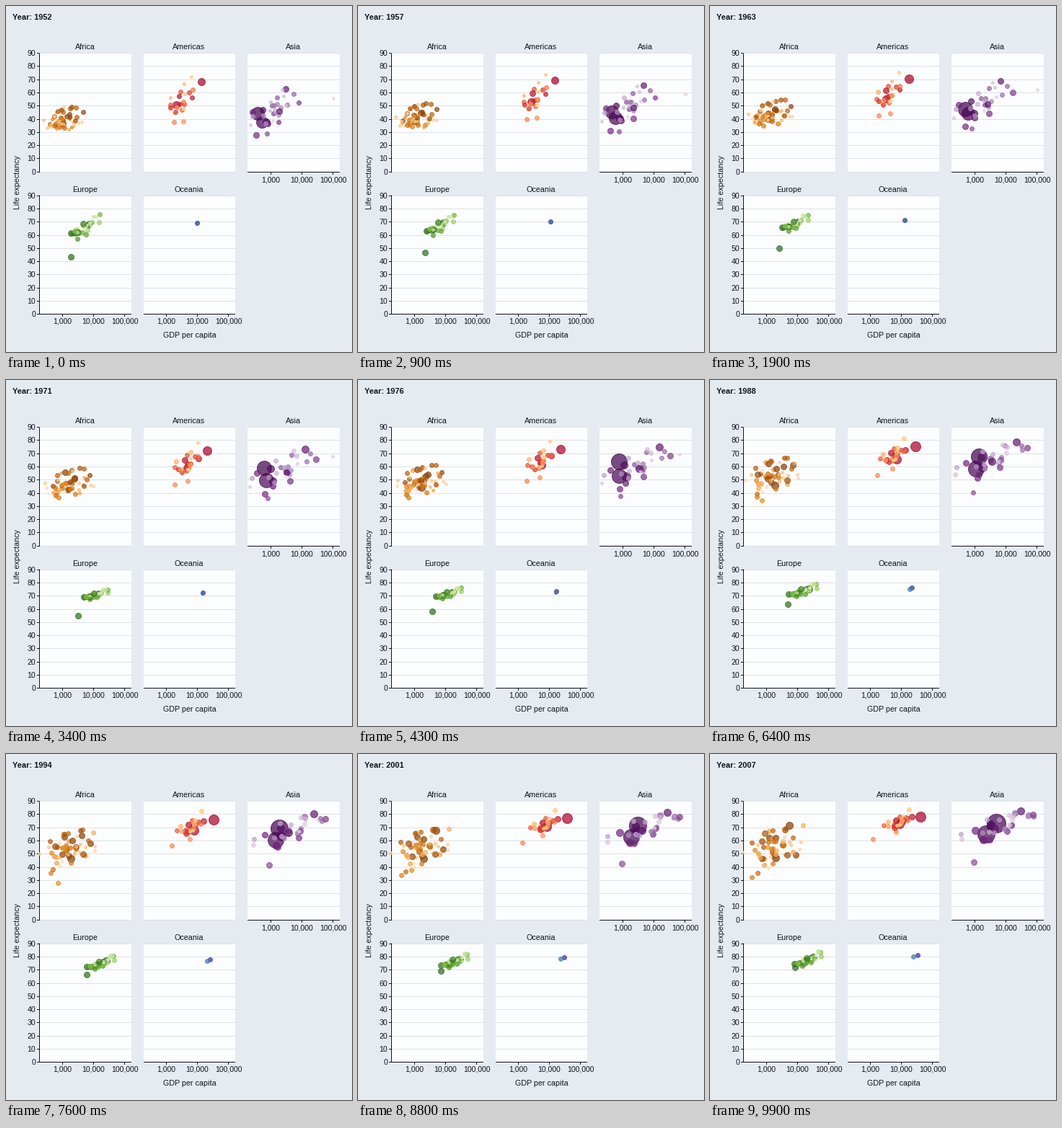
Write a matplotlib script that moves like this. It is 480x480 px and loops after 10 s.

```python
import matplotlib.pyplot as plt
import numpy as np
from matplotlib.animation import FuncAnimation
from matplotlib.colors import LinearSegmentedColormap
from matplotlib.patches import Rectangle

SIZE, DPI = 480, 100
PX = 72 / DPI                      # one pixel in points
FRAMES, FIRST, LAST = 100, 1952, 2007
U = np.linspace(0, 1, FRAMES)      # progress through the years
COLS, ROWS = (46.2, 190.6, 335.1), (230.2, 427.7)
PANEL_W, PANEL_H, UNIT, DECADE = 127.6, 165, 164.5 / 90, 43
INK = "#10141c"

plt.rcParams["font.family"] = "Liberation Sans"

# trend: (log income, life, spread of each) of the crowd, evenly spaced in time
# key: rank -> (population in millions, evenly spaced (income, life) points)
# crowd: largest population and its decay with rank
PANELS = [
    dict(title="Africa", col=0, row=0, n=52, crowd=(70, 0.08), growth=0.27,
         colors=["#7F3B08", "#B35806", "#E08214", "#FDB863", "#FEE0B6"],
         tie=0.4, turn=0.8,
         trend=[(3.02, 39, 0.28, 5), (3.19, 46.5, 0.36, 6),
                (3.18, 53.4, 0.39, 7.5), (3.24, 54.8, 0.42, 9)],
         key={0: (135, [(1077, 36.3), (1900, 45.5), (2014, 46.9)]),
              1: (80, [(1419, 42), (3200, 55.5), (5581, 71.3)]),
              4: (44, [(4725, 45), (7600, 53), (7500, 61.5), (9270, 49.3)]),
              28: (9, [(493, 40), (520, 43.5), (780, 45.5), (735, 26.5),
                       (863, 46.2)])}),
    dict(title="Americas", col=1, row=0, n=25, crowd=(75, 0.14), growth=0.42,
         colors=["#A50026", "#D73027", "#F46D43", "#FDAE61", "#FEE090"],
         tie=0.6, turn=0.5,
         trend=[(3.5, 53.5, 0.21, 8.5), (3.68, 62, 0.21, 6.5),
                (3.76, 69, 0.21, 4.8), (3.92, 74, 0.22, 3.5)],
         key={0: (301, [(13990, 68.4), (25000, 73.8), (42952, 78.2)]),
              1: (190, [(2109, 50.9), (6800, 62.5), (9066, 72.4)]),
              14: (8, [(1840, 37.6), (1950, 50.7), (1202, 60.9)])}),
    dict(title="Asia", col=2, row=0, n=33, crowd=(200, 0.13), growth=0.39,
         colors=["#40004B", "#762A83", "#9970AB", "#C2A5CF", "#E7D4E8"],
         tie=0.7, turn=0.6,
         trend=[(3.1, 46.5, 0.38, 8.5), (3.4, 57, 0.48, 8.5),
                (3.6, 66, 0.5, 7), (3.82, 71, 0.5, 6)],
         key={0: (1318, [(400, 44), (513, 47.3), (700, 63.5), (1210, 66.6),
                         (2160, 70.1), (4959, 73)]),
              1: (1110, [(547, 37.4), (840, 55.5), (2452, 64.7)]),
              2: (224, [(750, 37.5), (1450, 54.5), (3541, 70.7)]),
              5: (127, [(3217, 63), (13000, 72.8), (23500, 79), (31656, 82.6)]),
              12: (32, [(779, 28.8), (880, 39.2), (975, 43.8)]),
              31: (2.5, [(108382, 55.6), (105000, 67.4), (30000, 74.5),
                         (47307, 77.6)])}),
    dict(title="Europe", col=0, row=1, n=30, crowd=(80, 0.14), growth=0.8,
         colors=["#276419", "#4D9221", "#7FBC41", "#B8E186", "#E6F5D0"],
         tie=0.85, turn=0.3,
         trend=[(3.68, 65.2, 0.26, 4.8), (4.04, 70.6, 0.22, 1.9),
                (4.17, 73.8, 0.26, 2.6), (4.35, 77.7, 0.25, 2.9)],
         key={0: (82, [(7144, 67.5), (21200, 73.2), (32170, 79.4)]),
              1: (71, [(1969, 43.6), (4250, 60.3), (8458, 71.8)])}),
    dict(title="Oceania", col=1, row=1, n=2, crowd=(20, 1), growth=0.43,
         colors=["#313695", "#4575B4"], tie=0, turn=0, trend=[],
         key={0: (20, [(10040, 69.1), (18900, 74.1), (34435, 81.2)]),
              1: (4, [(10557, 69.4), (17000, 73), (25185, 80.2)])}),
]


def px_x(col, log_income):
    return COLS[col] + 32 + DECADE * (log_income - 3)


def px_y(row, life):
    return ROWS[row] - UNIT * life


def center(v):
    """Middle of the pixel that holds v."""
    return np.floor(v) + 0.5


def over_time(points):
    """Straight moves between evenly spaced points, one column per value."""
    points = np.array(points, float)
    knots = np.linspace(0, 1, len(points))
    return [np.interp(U, knots, column) for column in points.T]


def radius(pop, growth):
    now = pop * (growth + (1 - growth) * U)
    return np.floor(0.354 + 1.067 * (2 + 10 * np.sqrt(now / 1318)))


def crowd_paths(panel, count, rng):
    """Correlated cloud that follows the trend while it slowly reshuffles."""
    z = np.clip(rng.normal(size=(4, count)), -1.9, 1.9)
    z = (z - z.mean(1, keepdims=True)) / z.std(1, keepdims=True)
    angle = panel["turn"] * U
    a, b = (np.outer(z[k], np.cos(angle)) + np.outer(z[k + 1], np.sin(angle))
            for k in (0, 2))
    b = panel["tie"] * a + np.sqrt(1 - panel["tie"] ** 2) * b
    income, life, spread_income, spread_life = over_time(panel["trend"])
    return income + a * spread_income, life + b * spread_life


def bubbles_of(panel, rng):
    """List of (rank, log income, life, radius), large landmarks first."""
    out = []
    for rank, (pop, points) in panel["key"].items():
        logs = [(np.log10(income), life) for income, life in points]
        out.append((rank, *over_time(logs), radius(pop, panel["growth"])))
    rest = [k for k in range(panel["n"]) if k not in panel["key"]]
    if rest:
        top, decay = panel["crowd"]
        ranks = rng.permutation(rest)
        for rank, income, life in zip(ranks, *crowd_paths(panel, len(rest), rng)):
            pop = top * np.exp(-decay * rank)
            out.append((rank, income, life, radius(pop, panel["growth"])))
    return out


fig = plt.figure(figsize=(SIZE / DPI, SIZE / DPI), dpi=DPI, facecolor="#E6EBF2")
ax = fig.add_axes([0, 0, 1, 1])
ax.set(xlim=(0, SIZE), ylim=(SIZE, 0))
ax.axis("off")


def line(x0, y0, x1, y1, color=INK, z=2):
    ax.plot([x0, x1], [y0, y1], color=color, lw=PX, zorder=z,
            solid_capstyle="butt", snap=False)


def text(x, y, s, size=10.5, **kw):
    kw = {"ha": "center", "va": "baseline", "color": INK, **kw}
    return ax.text(x, y, s, fontsize=size * PX, **kw)


def draw_panel(title, col, row):
    left, base = round(COLS[col]), center(ROWS[row])
    right, top = round(COLS[col] + PANEL_W), base - PANEL_H
    ax.add_patch(Rectangle((left, top), right - left, PANEL_H + 0.5,
                           fc="#FCFDFE", lw=0))
    text((left + right) / 2 - 0.5, top - 5, title, 10.8)
    for v in range(0, 91, 10):
        y = center(px_y(row, v))
        line(left, y, right, y, "#DDE1E6", 1)
        if col == 0:
            line(left - 3, y, left, y)
            text(left - 5, y + 3.5, str(v), ha="right")
    if col == 0:
        line(left + 0.5, top, left + 0.5, base + 0.5)
    if row == 1 or col == 2:
        line(left, base, right, base)
        for power in (3, 4, 5):
            x = center(px_x(col, power))
            line(x, base, x, base + 3.5)
            text(x, base + 13.5, f"{10 ** power:,}")


rng = np.random.default_rng(7)
tracks, colors = [], []
for panel in PANELS:
    col, row = panel["col"], panel["row"]
    draw_panel(panel["title"], col, row)
    shades = LinearSegmentedColormap.from_list(panel["title"], panel["colors"])
    for rank, income, life, r in bubbles_of(panel, rng):
        tracks.append((center(px_x(col, income)), center(px_y(row, life)), r))
        colors.append(shades(rank / (panel["n"] - 1), alpha=0.7))

text(254.5, 460, "GDP per capita", 10.7)
text(16, 245, "Life expectancy", 10.6, rotation=90, va="center")
year = text(9, 19, "", 11, ha="left", weight="bold")

xs, ys, radii = np.array(tracks).transpose(1, 2, 0)
bubbles = ax.scatter(xs[0], ys[0], facecolors=colors, edgecolors=colors,
                     linewidths=PX, zorder=3, snap=False)


def update(i):
    year.set_text(f"Year: {round(FIRST + (LAST - FIRST) * U[i])}")
    bubbles.set_offsets(np.column_stack([xs[i], ys[i]]))
    bubbles.set_sizes((2 * radii[i] * PX) ** 2, DPI)
    return bubbles, year


anim = FuncAnimation(fig, update, frames=FRAMES, interval=100, repeat=True,
                     repeat_delay=0)
plt.show()
```
